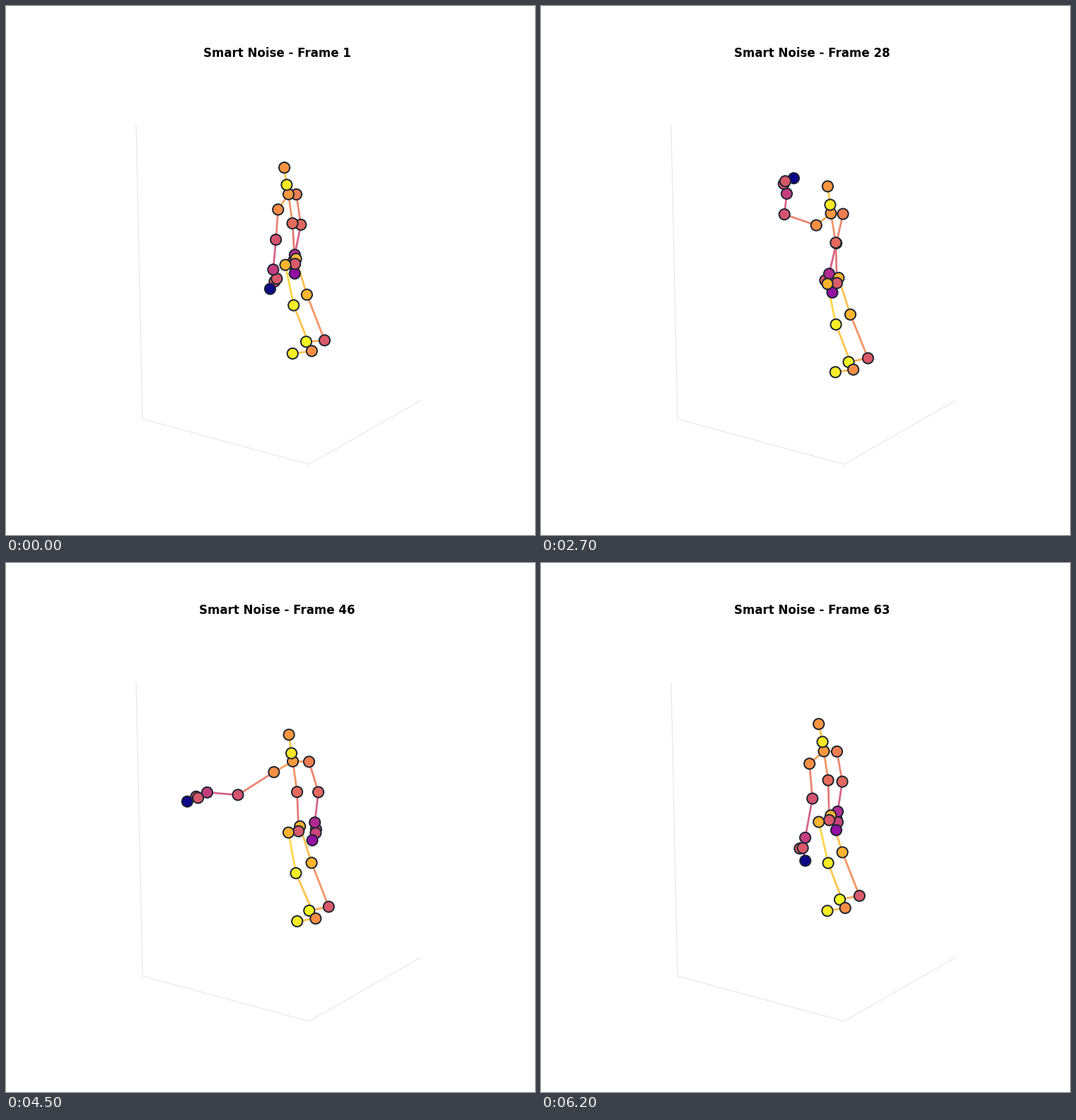
Animation of 748 by 748 pixels, one loop 6.3 s. Source, as a matplotlib script:

```python
import numpy as np
import matplotlib.pyplot as plt
from matplotlib.animation import FuncAnimation
from matplotlib.collections import LineCollection

SIZE, DPI = 748, 100
FRAMES, STEP = 63, 100
KEYS = np.array([0, 11, 19, 27, 38, 51, 62])
TIMES = np.arange(FRAMES)
# The waving arm swings out early and holds before it drops.
WAVE = np.interp(TIMES, [0, 27, 33, 38, 43, 51, 62], [0, 27, 37, 38, 39.5, 51, 62])

rng = np.random.default_rng(4)
plasma = plt.get_cmap("plasma")
paths, shades, parents = {}, {}, {}


def smooth(start, end):
    u = np.clip((TIMES - start) / (end - start), 0, 1)
    return u * u * (3 - 2 * u)


def curve(*vals, t=TIMES):
    """Cubic Hermite curve through one value per key time."""
    vals = np.array(vals, float)
    slope = np.gradient(vals, KEYS)
    i = np.clip(np.searchsorted(KEYS, t, side="right") - 1, 0, len(KEYS) - 2)
    span = KEYS[i + 1] - KEYS[i]
    u = (t - KEYS[i]) / span
    return ((2 * u**3 - 3 * u**2 + 1) * vals[i] + (u**3 - 2 * u**2 + u) * span * slope[i]
            + (3 * u**2 - 2 * u**3) * vals[i + 1] + (u**3 - u**2) * span * slope[i + 1])


# Whole-body motion: sideways sway, a long dip, shoulder twist, far arm swing.
sway = curve(0, 5, 1, 11, 16, -2, 0)
dip = 27 * (smooth(7, 21) - smooth(40, 51))
twist = curve(-4, -4, -14.5, 1, 5, 8.5, 2)
swing = curve(-4, 0, -7, -15, 13, 15, 6)

# Waving arm: angles in degrees (clockwise from right) and foreshortened lengths.
upper = curve(94, 87, 145, 198, 178, 85, 86, t=WAVE)
fore = curve(95, 140, 276, 277, 227, 100, 100, t=WAVE)
hand = curve(73, 157, 297, 256, 195, 69, 105, t=WAVE)
fingers = curve(125, 127, 342, 329, 194, 114, 76, t=WAVE)
upper_len = curve(43, 33, 43, 48, 63, 50, 50, t=WAVE)
fore_len = curve(43, 51, 42, 29, 44, 42, 55, t=WAVE)


def add(name, shade, parent, x, y):
    path = np.column_stack([x, y])
    paths[name] = path + rng.normal(0, 0.7, path.shape)
    shades[name], parents[name] = shade, parent


def joint(name, shade, parent, x, y, turn=0, reach=0):
    """Joint at a rest place, carried by the body."""
    add(name, shade, parent, x + sway + turn * twist + reach * swing, y + dip)


def limb(name, shade, parent, angle, length):
    """Joint that pivots around its parent."""
    a = np.radians(angle)
    x, y = paths[parent].T
    add(name, shade, parent, x + length * np.cos(a), y + length * np.sin(a))


# Joints are listed from back to front.
joint("far shoulder", .68, "chest", 415, 266.5, turn=1)
joint("far elbow", .61, "far shoulder", 420, 308.5, reach=0.9)
joint("far thumb", .55, "far wrist", 410, 361, reach=1.3)
joint("far hand", .49, "far wrist", 413, 366.5, reach=1.1)
joint("far wrist", .40, "far elbow", 412, 351.5, reach=1.1)
joint("far tip", .31, "far hand", 412.5, 378, reach=0.8)

joint("far hip", .835, "base", 410, 357.5)
joint("far knee", .835, "far hip", 425.5, 408.5)
joint("far ankle", .56, "far knee", 450.5, 472)
joint("far foot", 1, "far ankle", 423.5, 475.5)

joint("base", .57, "middle", 407.5, 363.5)
joint("middle", .62, "chest", 405, 308.5)
joint("chest", .76, None, 399.5, 266.5)
joint("neck", .96, "chest", 397.5, 253)
joint("head", .75, "neck", 394, 228)

joint("near hip", .835, "base", 394, 366, turn=-0.2)
joint("near knee", .97, "near hip", 406, 424, turn=-0.3)
joint("near foot", .965, "near ankle", 405, 491)
joint("near ankle", .73, "near knee", 431.5, 487.5, turn=-0.2)

joint("near shoulder", .73, "chest", 380.5, 284 - 0.5 * twist, turn=-1)
limb("near elbow", .54, "near shoulder", upper, upper_len)
limb("near wrist", .47, "near elbow", fore, fore_len)
limb("near hand", .56, "near wrist", hand, 14)
limb("near thumb", .56, "near wrist", hand + 10, 17)
limb("near tip", 0, "near hand", fingers, 17)

names = list(paths)
body = names[:-4]
lowered = body + ["near thumb", "near hand", "near wrist", "near tip"]
raised = body + ["near tip", "near wrist", "near hand", "near thumb"]
bones = [(n, parents[n]) for n in names if parents[n]]

fig = plt.figure(figsize=(SIZE / DPI, SIZE / DPI), dpi=DPI, facecolor="white")
ax = fig.add_axes([0, 0, 1, 1])
ax.set(xlim=(0, SIZE), ylim=(SIZE, 0))
ax.axis("off")

ax.plot([184, 193, 428.5, 586], [169, 584, 648, 558], color="#e6e6e6", lw=0.8)
sticks = LineCollection([], linewidths=2, alpha=0.85, zorder=2, capstyle="projecting",
                        colors=[plasma((shades[a] + shades[b]) / 2) for a, b in bones])
ax.add_collection(sticks)
dots = ax.scatter(np.zeros(len(names)), np.zeros(len(names)), s=120,
                  edgecolors="#1b2430", linewidths=1.4, zorder=3)
title = ax.text(383.4, 72, "", ha="center", va="baseline", fontsize=12,
                fontweight="bold", family="DejaVu Sans", color="black")


def draw(i):
    order = raised if fore[i] > 200 else lowered
    sticks.set_segments([[paths[a][i], paths[b][i]] for a, b in bones])
    dots.set_offsets([paths[n][i] for n in order])
    dots.set_facecolor([plasma(float(shades[n])) for n in order])
    title.set_text(f"Smart Noise - Frame {i + 1}")
    return sticks, dots, title


anim = FuncAnimation(fig, draw, frames=FRAMES, interval=STEP, repeat=True, repeat_delay=0)
plt.show()
```
